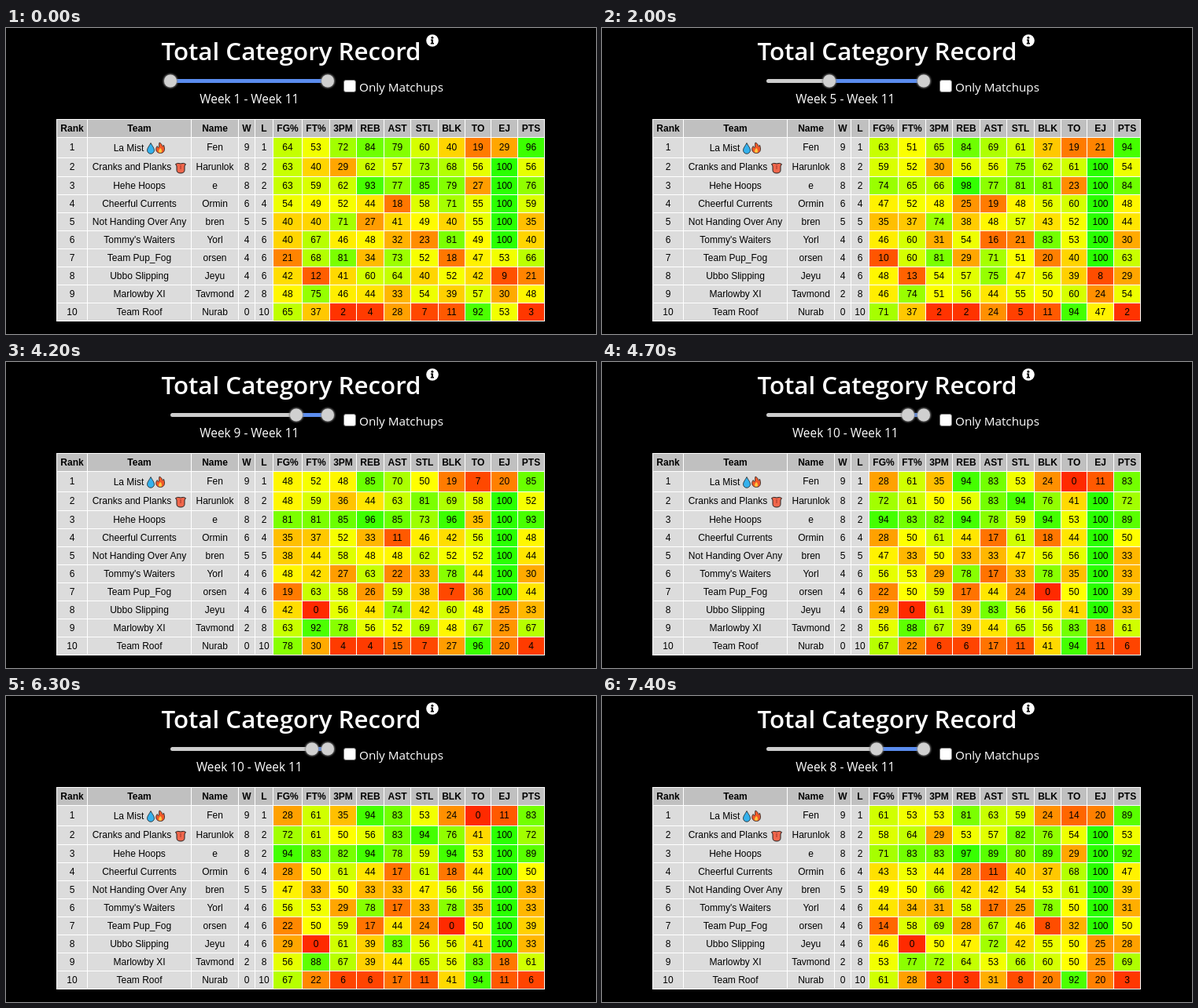
Write an HTML page that moves like this. It is 750x390 px and loops after 8000 ms.

```html
<!DOCTYPE html>
<html lang="en">
<head>
<meta charset="utf-8">
<title>Total Category Record</title>
<style>
html, body { margin: 0; width: 100%; height: 100%; overflow: hidden; background: #000; }
svg { display: block; width: 750px; height: 390px; }
.ui { font-family: "Open Sans", "Noto Sans", sans-serif; fill: #fff; }
#table { font: 12px "Liberation Sans", Arial, sans-serif; text-anchor: middle; }
.head { font-weight: bold; }
</style>
</head>
<body>
<svg viewBox="0 0 750 390">
  <defs>
    <filter id="glow" x="-50%" y="-50%" width="200%" height="200%"><feGaussianBlur stdDeviation="1"/></filter>
    <g id="thumb">
      <circle r="9" fill="#8b8b8b" filter="url(#glow)"/>
      <circle r="8" fill="#d0d0d0"/>
    </g>
  </defs>
  <g class="ui">
    <text x="362.5" y="41" font-size="31.3" font-weight="600" text-anchor="middle">Total Category Record</text>
    <text id="range" x="309.3" y="96" font-size="15.4" text-anchor="middle"></text>
    <text x="449" y="81" font-size="15.25">Only Matchups</text>
  </g>
  <circle cx="542" cy="16" r="7.8" fill="#fff"/>
  <path d="M540 14.5h3v4.5h1v1.6h-4.2v-1.6h1v-2.9h-.8z"/>
  <circle cx="541.9" cy="12.2" r="1.5"/>
  <rect x="429.5" y="66.5" width="15" height="15" rx="2.5" fill="#fff" stroke="#767676"/>
  <rect x="209" y="65" width="200" height="5" rx="2.5" fill="#ccc"/>
  <rect id="span" y="65" height="5" fill="#5b8def"/>
  <use id="low" href="#thumb" y="67.5"/>
  <use href="#thumb" x="409" y="67.5"/>
  <g id="table"></g>
  <g stroke="#222" stroke-linejoin="round">
    <path d="M184 146.5c-2 4-4.5 6.500-4.500 9.300a4.500 4.500 0 0 0 9 0c0-2.800-2.500-5.300-4.500-9.300z" fill="#35b1ec" stroke-width=".8"/>
    <path d="M195 146c4 2 3 4 4.500 5 1-1 .8-1.500 .8-2 2 4 2.200 10.500-4 10.500-6 0-7-6-4-9 .3 1.500 1 2 1.500 2 1.500-2 .2-4 1.200-6.500z" fill="#f0592a" stroke-width=".8"/>
    <path d="M196.300 153c2 2 2.700 6-.2 6-3 0-2.500-3.500 .2-6z" fill="#ffc83d" stroke="none"/>
    <path d="M215.500 173.500q3-2 6.500-.5 3.500-1.500 6.500 .5l-1.500 2.500v5q0 4-5 4t-5-4v-5z" fill="#f0674c"/>
    <path d="M222 175v5" fill="none" stroke="#a33628"/>
  </g>
</svg>
<script>
const svg = document.querySelector("svg");
const $ = id => document.getElementById(id);

const xs = [64, 103, 235, 295, 316, 339, 376, 411, 445, 480, 514, 549, 583, 616, 650, 684];
const ys = [116, 139, 165, 189, 212, 235, 258, 281, 304, 327, 350, 373];
const heads = "Rank,Team,Name,W,L,FG%,FT%,3PM,REB,AST,STL,BLK,TO,EJ,PTS".split(",");
const teams = `La Mist,Fen,9,1
Cranks and Planks,Harunlok,8,2
Hehe Hoops,e,8,2
Cheerful Currents,Ormin,6,4
Not Handing Over Any,bren,5,5
Tommy's Waiters,Yorl,4,6
Team Pup_Fog,orsen,4,6
Ubbo Slipping,Jeyu,4,6
Marlowby XI,Tavmond,2,8
Team Roof,Nurab,0,10`.split("\n").map(row => row.split(","));

// Scores by first week of the range; the last week is always 11.
const scores = {
1: `64 53 72 84 79 60 40 19 29 96
63 40 29 62 57 73 68 56 100 56
63 59 62 93 77 85 79 27 100 76
54 49 52 44 18 58 71 55 100 59
40 40 71 27 41 49 40 55 100 35
40 67 46 48 32 23 81 49 100 40
21 68 81 34 73 52 18 47 53 66
42 12 41 60 64 40 52 42 9 21
48 75 46 44 33 54 39 57 30 48
65 37 2 4 28 7 11 92 53 3`,
5: `63 51 65 84 69 61 37 19 21 94
59 52 30 56 56 75 62 61 100 54
74 65 66 98 77 81 81 23 100 84
47 52 48 25 19 48 56 60 100 48
35 37 74 38 48 57 43 52 100 44
46 60 31 54 16 21 83 53 100 30
10 60 81 29 71 51 20 40 100 63
48 13 54 57 75 47 56 39 8 29
46 74 51 56 44 55 50 60 24 54
71 37 2 2 24 5 11 94 47 2`,
7: `62 44 58 82 66 63 29 20 27 91
58 51 30 58 52 74 79 64 100 53
77 82 77 98 84 84 76 25 100 91
43 51 44 24 9 45 45 70 100 42
41 51 70 42 51 61 49 55 100 47
42 45 27 60 18 21 82 45 100 27
11 60 75 27 64 38 16 40 100 53
41 7 53 49 78 45 55 40 14 29
58 66 62 58 44 60 50 51 31 64
67 42 2 2 33 7 16 91 27 2`,
8: `61 53 53 81 63 59 24 14 20 89
58 64 29 53 57 82 76 54 100 53
71 83 83 97 89 80 89 29 100 92
43 53 44 28 11 40 37 68 100 47
49 50 66 42 42 54 53 61 100 39
44 34 31 58 17 25 78 50 100 31
14 58 69 28 67 46 8 32 100 50
46 0 50 47 72 42 55 50 25 28
53 77 72 64 53 66 60 50 25 69
61 28 3 3 31 8 20 92 20 3`,
9: `48 52 48 85 70 50 19 7 20 85
48 59 36 44 63 81 69 58 100 52
81 81 85 96 85 73 96 35 100 93
35 37 52 33 11 46 42 56 100 48
38 44 58 48 48 62 52 52 100 44
48 42 27 63 22 33 78 44 100 30
19 63 58 26 59 38 7 36 100 44
42 0 56 44 74 42 60 48 25 33
63 92 78 56 52 69 48 67 25 67
78 30 4 4 15 7 27 96 20 4`,
10: `28 61 35 94 83 53 24 0 11 83
72 61 50 56 83 94 76 41 100 72
94 83 82 94 78 59 94 53 100 89
28 50 61 44 17 61 18 44 100 50
47 33 50 33 33 47 56 56 100 33
56 53 29 78 17 33 78 35 100 33
22 50 59 17 44 24 0 50 100 39
29 0 61 39 83 56 56 41 100 33
56 88 67 39 44 65 56 83 18 61
67 22 6 6 17 11 41 94 11 6`,
11: `0 78 22 89 89 38 25 0 100 67
44 56 50 56 67 89 89 63 100 56
100 67 78 100 100 38 100 25 100 100
56 11 100 67 33 100 25 25 100 89
13 33 0 0 0 0 11 100 100 0
78 100 50 78 22 56 78 11 100 44
33 44 33 22 44 11 0 63 100 22
13 0 89 33 78 75 50 44 100 33
89 100 67 44 56 75 67 78 0 78
67 22 11 11 11 22 50 89 100 11`
};
const known = Object.keys(scores).map(Number);
for (const w of known) scores[w] = scores[w].split(/\s+/).map(Number);

// Missing weeks follow from running totals, linear between known weeks.
function scoresFrom(week) {
  if (scores[week]) return scores[week];
  const a = known.filter(w => w < week).pop(), b = known.find(w => w > week);
  return scores[a].map((v, i) => {
    const total = (v * (12 - a) * (b - week) + scores[b][i] * (12 - b) * (week - a)) / (b - a);
    return Math.round(total / (12 - week));
  });
}

function add(name, attrs, text = "") {
  const el = document.createElementNS(svg.namespaceURI, name);
  for (const key in attrs) el.setAttribute(key, attrs[key]);
  el.textContent = text;
  return $("table").appendChild(el);
}

function cell(row, col, text) {
  const x = xs[col] + 1, y = ys[row] + 1;
  const w = xs[col + 1] - x, h = ys[row + 1] - y;
  const box = add("rect", { x, y, width: w, height: h, fill: row ? "#dcdcdc" : "#c0c0c0" });
  let tx = x + w / 2, ty = Math.floor(y + h / 2) + 4;
  if (col === 1 && row === 1) { tx = 156; ty++; }
  if (col === 1 && row === 2) tx = 160;
  const label = add("text", { x: tx, y: ty, class: row ? "" : "head" }, text);
  return { box, label };
}

add("rect", { x: 64, y: 116, width: 621, height: 258, fill: "#fff" });
heads.forEach((h, col) => cell(0, col, h));
const scoreCells = [];
teams.forEach((team, i) => {
  [i + 1, ...team].forEach((text, col) => cell(i + 1, col, text));
  for (let col = 5; col < 15; col++) scoreCells.push(cell(i + 1, col, ""));
});

function show(week) {
  const x = 189 + 20 * week;
  $("low").setAttribute("x", x);
  $("span").setAttribute("x", x);
  $("span").setAttribute("width", 409 - x);
  $("range").textContent = `Week ${week} - Week 11`;
  scoresFrom(week).forEach((v, i) => {
    scoreCells[i].label.textContent = v;
    scoreCells[i].box.setAttribute("fill", `hsl(${10 + v}, 100%, 50%)`);
  });
}

// The slider climbs to week 11, then steps back.
const steps = [0, 500, 1000, 1500, 2000, 2500, 3000, 3600, 4200, 4700, 5300, 6300, 6900, 7400];
let shown;
function tick() {
  const t = performance.now() % 8000;
  const step = steps.filter(s => s <= t).length;
  const week = 11 - Math.abs(11 - step);
  if (week !== shown) show(shown = week);
  requestAnimationFrame(tick);
}
tick();
</script>
</body>
</html>
```
